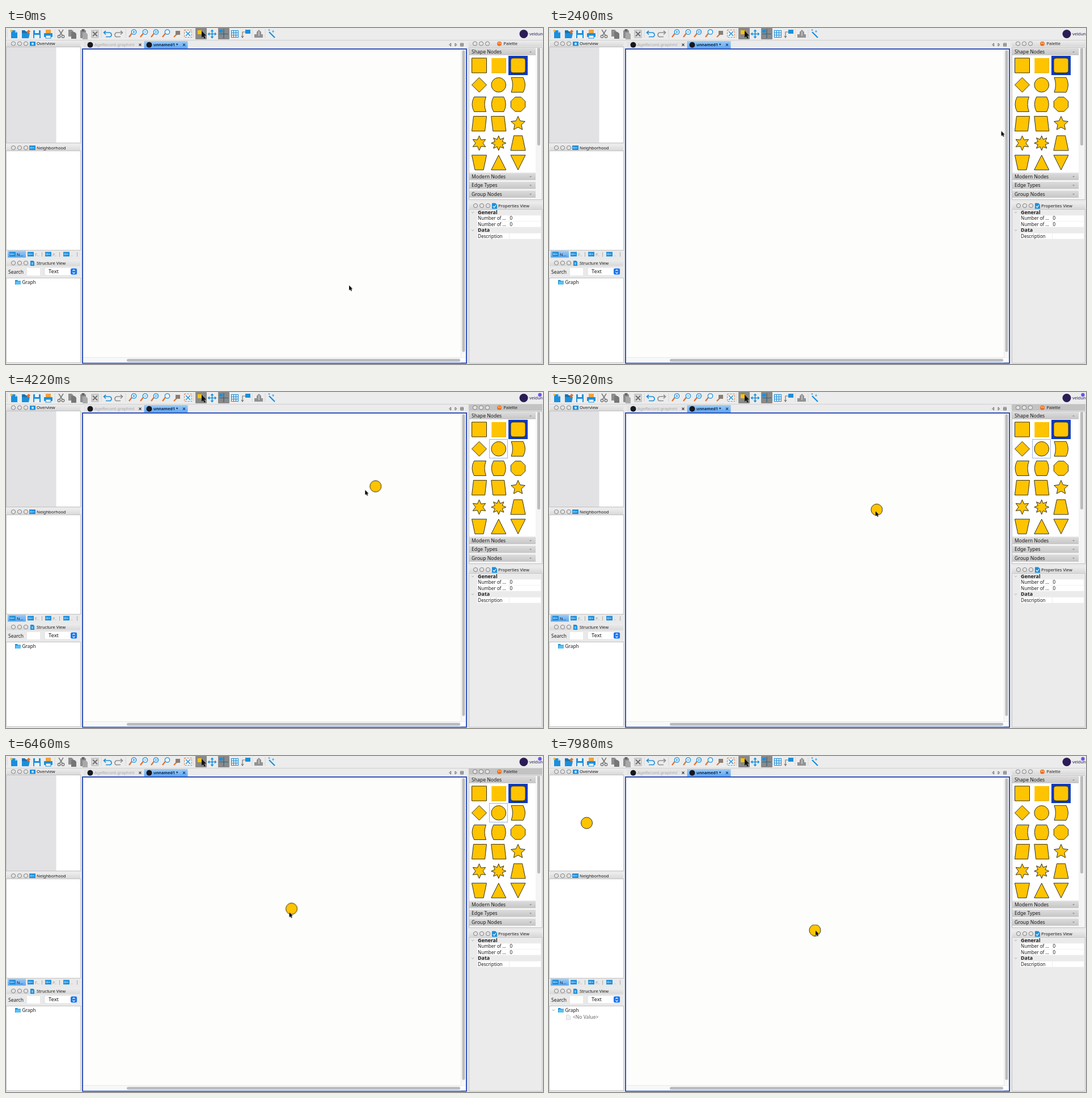
An HTML page for the animation above (8 s loop, 947 px wide and 592 px high).

```html
<!DOCTYPE html>
<html lang="en">
<head>
<meta charset="utf-8">
<title>Graph editor</title>
<style>
html, body { margin: 0; width: 100%; height: 100%; overflow: hidden; background: #e9e9e9; }
svg { display: block; width: 947px; height: 592px; font-family: "Noto Sans", "Open Sans", sans-serif; }
text { fill: #1c1c1c; white-space: pre; }
.shape { fill: #ffc400; stroke: #33301f; stroke-width: 1; }
.path { animation: drag 8s infinite; }
.lag { animation-delay: -7930ms; }
.flag { opacity: 0; animation: 8s step-end infinite; }
.hover { animation-name: hover; }
.pick { animation-name: pick; }
.carry { animation-name: carry; }
.drop { animation-name: drop; }
.dot { animation-name: dot; }
@keyframes drag {
  0% { transform: translate(605px, 453.5px); animation-timing-function: cubic-bezier(.45, 0, .6, 1); }
  17.5% { transform: translate(690px, 297.5px); animation-timing-function: cubic-bezier(.4, 0, .6, 1); }
  40.25%, 42.5% { transform: translate(874.5px, 98.5px); animation-timing-function: cubic-bezier(.4, 0, .7, .76); }
  52.75% { transform: translate(633.5px, 172.5px); animation-timing-function: cubic-bezier(.12, .42, .6, .62); }
  75% { transform: translate(530px, 239.5px); animation-timing-function: cubic-bezier(.3, .26, .6, .94); }
  87.75% { transform: translate(475.8px, 303.5px); animation-timing-function: ease-out; }
  95%, 100% { transform: translate(470px, 307.5px); }
}
@keyframes hover { 0% { opacity: 0 } 31.25% { opacity: 1 } 95%, 100% { opacity: 0 } }
@keyframes pick { 0% { opacity: 0 } 42.5% { opacity: 1 } 95%, 100% { opacity: 0 } }
@keyframes carry { 0% { opacity: 0 } 46.75%, 100% { opacity: 1 } }
@keyframes drop { 0% { opacity: 0 } 95%, 100% { opacity: 1 } }
@keyframes dot { 0% { opacity: 0 } 31.25%, 100% { opacity: 1 } }
</style>
</head>
<body>
<svg id="stage" viewBox="0 0 947 592">
  <defs>
    <linearGradient id="bar" x2="0" y2="1"><stop stop-color="#ededed"/><stop offset="1" stop-color="#d8d8d8"/></linearGradient>
    <linearGradient id="head" x2="0" y2="1"><stop stop-color="#dcdcdc"/><stop offset="1" stop-color="#c6c6c6"/></linearGradient>
    <linearGradient id="tab" x2="0" y2="1"><stop stop-color="#9ccbf7"/><stop offset="1" stop-color="#5da7ee"/></linearGradient>
  </defs>
</svg>
<script>
const BLUE = '#1b8fdc', GREY = '#8c8c8c', ORANGE = '#e2702a';

const rect = (x, y, w, h, fill, more = '') => `<rect x="${x}" y="${y}" width="${w}" height="${h}" fill="${fill}" ${more}/>`;
const line = (d, stroke, width = 1, more = '') => `<path d="${d}" fill="none" stroke="${stroke}" stroke-width="${width}" ${more}/>`;
const fill = (d, color) => `<path d="${d}" fill="${color}"/>`;
const disc = (x, y, r, color) => `<circle cx="${x}" cy="${y}" r="${r}" fill="${color}"/>`;
const text = (x, y, size, s, more = '') => `<text x="${x}" y="${y}" font-size="${size}" ${more}>${s}</text>`;
const at = (x, y, body) => `<g transform="translate(${x} ${y})">${body}</g>`;
const flag = (name, body) => `<g class="flag ${name}">${body}</g>`;

const lights = (x, y) => [0, 11, 22].map(d =>
  `<circle cx="${x + d}" cy="${y}" r="3.6" fill="#e4e4e4" stroke="#777" stroke-width=".9"/>`).join('');

const badge = (x, y) => rect(x, y, 11, 8, BLUE) +
  line(`M${x + 2} ${y + 2.5}v3M${x + 4.5} ${y + 2.5}v3M${x + 6} ${y + 4}h3`, '#d5ecff', 1.1);

const title = (x, y, w, name, icon, gap = 42) =>
  rect(x, y, w, 11, 'url(#bar)') + lights(x + 12, y + 5.5) + icon + text(x + 11 + gap, y + 8.2, 7.5, name);

const box = (x, y, w, h, color = '#fff') => rect(x + .5, y + .5, w, h, color, 'stroke="#c2c2c2"');

function toolbar() {
  const lens = (x, mark) => at(x, 10,
    line('M-1-.5L-6 6', ORANGE, 2.2) +
    `<circle cx="2.5" cy="-3" r="4.2" fill="#eef7fd" stroke="${BLUE}" stroke-width="1.3"/>` + line(mark, BLUE));
  const sheet = (x, y, color) => fill(`M${x} ${y}h6l3 3v9h-9z`, color);
  const pressed = x => rect(x, 0, 20, 20, '#898989', 'rx="1"');
  const grip = x => line(`M${x} 3V18`, '#b4b4b4', 1, 'stroke-dasharray="1 1.5"');
  const arrow = color => line('M-3-5L-6.5-2-3 1.500M-6-2H2.500Q7-2 7 2T2.500 5.500H-3', color, 1.7);

  return rect(0, 0, 947, 21, '#ececec') + line('M0 21.5H947', '#cfcfcf') +
    [2, 86, 168, 211, 331, 434, 457].map(grip).join('') +
    fill('M9 4h7l4 4v10H9z', BLUE) + fill('M16 4l4 4h-4z', '#9fd2f5') + disc(9.5, 5, 2, '#f2b632') +
    fill('M28 4h5l2 2h6v4H28z', '#1673b5') + fill('M28 9h14l-2 9H28z', BLUE) + fill('M36 7l4-4 3 3-4 4z', ORANGE) +
    rect(48, 4, 13, 14, BLUE, 'rx="1"') + rect(51, 4, 7, 5, '#eaf5fc') + rect(50, 12, 9, 6, '#eaf5fc') +
    rect(67, 9, 15, 7, BLUE, 'rx="1"') + rect(70, 3, 9, 6, '#f0a33b') + rect(70, 13, 9, 5, '#f6f6f6', `stroke="${BLUE}"`) +
    at(97, 10, line('M-4-7L2.500 3M4-7L-2.500 3', '#777', 1.5) +
      `<g fill="none" stroke="#777" stroke-width="1.400"><circle cx="-3.500" cy="5" r="2.300"/><circle cx="3.500" cy="5" r="2.300"/></g>`) +
    sheet(110, 3, '#8d8d8d') + sheet(115, 7, '#777') +
    rect(131, 4, 10, 14, GREY, 'rx="1"') + rect(133.5, 2, 5, 4, '#666') + sheet(135, 8, '#a9a9a9') +
    rect(151, 4, 12, 13, '#dedede', 'stroke="#aaa"') + line('M153 6.500l8 8m0-8l-8 8', '#6f6f6f', 2) +
    at(179, 10, arrow(BLUE)) + at(199, 10, `<g transform="scale(-1 1)">${arrow('#8f8f8f')}</g>`) +
    lens(223, 'M.5-3h4M2.500-5v4') + lens(243, 'M.5-3h4') + lens(262, 'M1.500-5v4M4-5v4') + lens(282, 'M1-3h0') +
    at(302, 10, line('M-6 6L0 0', ORANGE, 2.2) + rect(-3, -5, 8, 7, '#8a7d74')) +
    rect(314.5, 3.5, 13, 13, '#e8f3fb', `stroke="${ORANGE}" stroke-dasharray="3 2"`) +
    line('M317 6l8 8m0-8l-8 8', BLUE, 1.3) +
    pressed(334) + rect(338, 4, 7, 7, '#ffc400') + fill('M345 5v12l2.500-2.500 2 4 2-1-2-4h3.500z', '#111') +
    at(363.5, 10.5, line('M-5 0H5M0-5V5', BLUE, 1.7) +
      [0, 90, 180, 270].map(a => `<path d="M-3-4.500L0-8 3-4.500z" fill="${BLUE}" transform="rotate(${a})"/>`).join('')) +
    pressed(374) + line('M384 2V18M376 10.500H392', '#35617e', 1.2) + rect(376, 3, 6, 5, BLUE) +
    line('M397 4.500h13M397 8.500h13M397 12.500h13M397 16.500h13M397.500 4v13M401.500 4v13M405.500 4v13M409.500 4v13', BLUE, 1.1) +
    rect(422, 3, 9, 7, BLUE) + line('M422 7h-5v9M415 14l2 3 2-3', '#777', 1.2) +
    fill('M438 17v-6h4V7l4-4 4 4v4h3v6z', '#929292') + line('M446 6v8', '#ddd', 1.2) +
    line('M464 7L474 17', BLUE, 2.3) + line('M471 4v4M469 6h4M464 2v3M462.500 3.500h3', '#3da6e8', 1.2) +
    disc(913, 10.5, 7.5, '#2b1c55') + text(923, 13.3, 7.4, 'veldun', 'style="fill:#2b1c55"');
}

function leftSide() {
  const tabIcons = [6, 38, 69, 101], tabNames = ['N...', 'F..', 'P..', '..'];
  return title(1, 22, 130, 'Overview', rect(42, 24, 10, 7.5, BLUE) + disc(47, 27.7, 2, '#dff1ff')) +
    box(0, 33, 131, 169) + rect(1, 34, 87.5, 168, '#e2e2e5') +
    flag('drop', rect(1, 34, 130, 168, '#fff') + '<circle class="shape" cx="66.500" cy="118" r="10"/>') +
    title(1, 205.5, 130, 'Neighborhood', badge(41, 207)) + box(0, 216, 131, 175) +
    rect(3, 392.5, 32, 12, 'url(#tab)') +
    tabIcons.map((x, i) => badge(x, 394.5) +
      text(x + 13, 401.5, 7.2, tabNames[i], i ? 'style="fill:#999"' : '')).join('') +
    line('M63.500 395v8M94.500 395v8M125.500 395v8', '#aaa') +
    title(1, 408.5, 130, 'Structure View', fill('M43 410h5l2 2v7h-7z', BLUE) + line('M45 414h3M45 416h3', '#d9eefc')) +
    text(4, 432.5, 8.5, 'Search') + rect(37, 423, 23, 13, '#fff') +
    rect(68, 422, 57, 14, '#fff', 'rx="3" stroke="#d6d6d6" stroke-width=".6"') + text(75, 432.3, 9.4, 'Text') +
    rect(114, 423.5, 11, 11, '#1677f0', 'rx="2.500"') + line('M117.500 428l2-2 2 2M117.500 430.500l2 2 2-2', '#fff', 1.1) +
    box(0, 440, 131, 149) +
    fill('M16 444h4l1 1.500h5v6.500H16z', '#1d94d8') + rect(17, 446.5, 9, 5.500, '#5cc0f3') + text(28.5, 450.8, 8.3, 'Graph') +
    flag('drop', line('M5.500 446.500l2.300 2.500 2.300-2.500', '#999', .9) +
      `<path d="M30.500 456.500h4.500l2.500 2.500v5.500h-7z" fill="#f2f2f2" stroke="#ccc" stroke-width=".7"/>` +
      text(42, 463.3, 8.5, '&lt;No Value&gt;', 'style="fill:#666"'));
}

function editor() {
  const cross = (x, color) => line(`M${x - 2} 27.700l4 4m0-4l-4 4`, color, 1.2);
  return rect(134, 23, 679, 13, '#ebebeb') + rect(137, 23.5, 105, 12.5, '#e4e4e4') + rect(243.5, 23, 77, 13, 'url(#tab)') +
    disc(148.5, 29.7, 5, '#16181d') + text(156, 32.2, 7.5, 'AgeRecord.graphml', 'style="fill:#a6a6a6"') + cross(236.5, '#333') +
    disc(252.5, 29.7, 5, '#16181d') + text(260, 32.2, 7.1, 'unnamed1 *', 'font-weight="700" style="fill:#0c2448"') + cross(314, '#163a78') +
    line('M784.500 27l-3 2.500 3 2.500zM792 27l3 2.500-3 2.500z', '#555', .9) +
    line('M801.500 27h5v5h-5zM801.500 29.500h5M804 27v5', '#555', .8) +
    rect(135, 37, 677, 553.5, '#fdfdfc', 'stroke="#1f43b8" stroke-width="1.800"') +
    rect(802.5, 38, 8.5, 541, '#f7f7f7') + rect(136, 580, 666, 9.500, '#f8f8f8') +
    line('M802.500 38V580M136 580.500H811', '#e9e9e9') +
    rect(804.5, 39, 4.8, 532, '#bcbcbc', 'rx="2.400"') + rect(213, 583, 588, 5, '#bcbcbc', 'rx="2.500"');
}

function palette() {
  const poly = pts => `<path class="shape" d="M${pts}z"/>`;
  const ring = (n, radius, turn = -90) => poly(Array.from({ length: n }, (_, i) => {
    const a = (turn + i * 360 / n) * Math.PI / 180, r = radius(i);
    return `${(r * Math.cos(a)).toFixed(2)} ${(r * Math.sin(a)).toFixed(2)}`;
  }).join('L'));
  const star = (tips, outer, inner) => ring(tips * 2, i => i % 2 ? inner : outer);
  const shapes = [
    poly('-13-13H13V13H-13'),
    rect(-12.5, -13, 25, 26, '#ffc400') + line('M-12.500 13H12.500V-13', '#dba400'),
    rect(-17, -17, 34, 34, '#0a39c4') + '<rect class="shape" x="-13" y="-13" width="26" height="26" rx="4"/>',
    ring(4, () => 13),
    '<circle class="shape" r="12.800"/>',
    poly('-12-13H9Q16 0 9 13H-12Q-7 0-12-13'),
    poly('-9-13H12Q7 0 12 13H-9Q-16 0-9-13'),
    poly('-9-13H9Q16 0 9 13H-9Q-16 0-9-13'),
    ring(8, () => 13.7, 22.5),
    poly('-10-13H13L10 13H-13'),
    poly('-13-13H10L13 13H-10'),
    star(5, 13, 6.2),
    star(6, 13, 6.5),
    star(8, 13, 7),
    poly('-7.500-13H7.500L13 13H-13'),
    poly('-13-13H13L7.500 13H-7.500'),
    poly('0-13L13 13H-13'),
    poly('-13-13H13L0 13'),
  ];
  const section = (y, name, mark) => rect(817, y, 117, 12.5, 'url(#head)') + text(821, y + 9.2, 8.6, name) +
    fill(mark, '#8a8a8a');
  const down = y => `M923 ${y}h4l-2 2z`;
  const bar = hue => rect(816, 22, 130, 11, hue) + lights(827, 27.500) + disc(870, 27.7, 4, '#ea7426') +
    disc(868.7, 26.5, 1, '#ffd9a8') + disc(871.5, 27, 1, '#ffd9a8') + text(877.5, 30.2, 7.5, 'Palette');

  return bar('url(#bar)') + flag('hover', bar('#c3c3c3')) + box(816, 34, 129, 268, '#f4f4f4') +
    rect(817, 48, 117, 206, '#fff') +
    section(35.5, 'Shape Nodes', 'M923 43h4l-2-2z') +
    shapes.map((s, i) => at(834.5 + i % 3 * 34.25, 66 + Math.floor(i / 3) * 34.2, s)).join('') +
    flag('pick', rect(852.5, 83.5, 32, 33, 'none', 'stroke="#9fb6e2"')) +
    section(255.5, 'Modern Nodes', down(261)) + section(271, 'Edge Types', down(276.5)) + section(286.5, 'Group Nodes', down(292)) +
    rect(937, 35, 5, 172, '#bcbcbc', 'rx="2.500"');
}

function properties() {
  const group = (y, name) => line(`M821 ${y - 4}l2 2.300 2-2.300`, '#aaa', .9) + text(832, y, 8.9, name, 'font-weight="700"');
  const row = (y, name, value = '') => rect(831, y - 8, 112, 9.8, '#fff') + line(`M887.500 ${y - 8}v9.800`, '#ececec') +
    text(832, y, 8.1, name) + text(888.5, y, 8.1, value);
  return title(816, 307.5, 130, 'Properties View',
      fill('M857 308.500h6l3 3v7h-9z', BLUE) + line('M859 314l2 2 3-4', '#fff', 1.2), 41) +
    box(816, 319, 129, 271, '#ebebeb') +
    group(327.7, 'General') + row(338.3, 'Number of ...', '0') + row(348.8, 'Number of ...', '0') +
    group(359.2, 'Data') + row(369.8, 'Description');
}

const node = flag('carry', '<g class="path lag"><circle class="shape" cx="-1" cy="-.5" r="10"/></g>');
const cursor = `<g class="path"><path d="M0 0V8.700L2 6.900 3.500 10 5 9.300 3.600 6.300H6.200z" fill="#000" stroke="#fff" stroke-width=".7" paint-order="stroke"/></g>`;

document.getElementById('stage').innerHTML +=
  toolbar() + leftSide() + editor() + palette() + properties() + flag('dot', disc(941.5, 5, 3.2, '#6a55e8')) + node + cursor;
</script>
</body>
</html>
```
